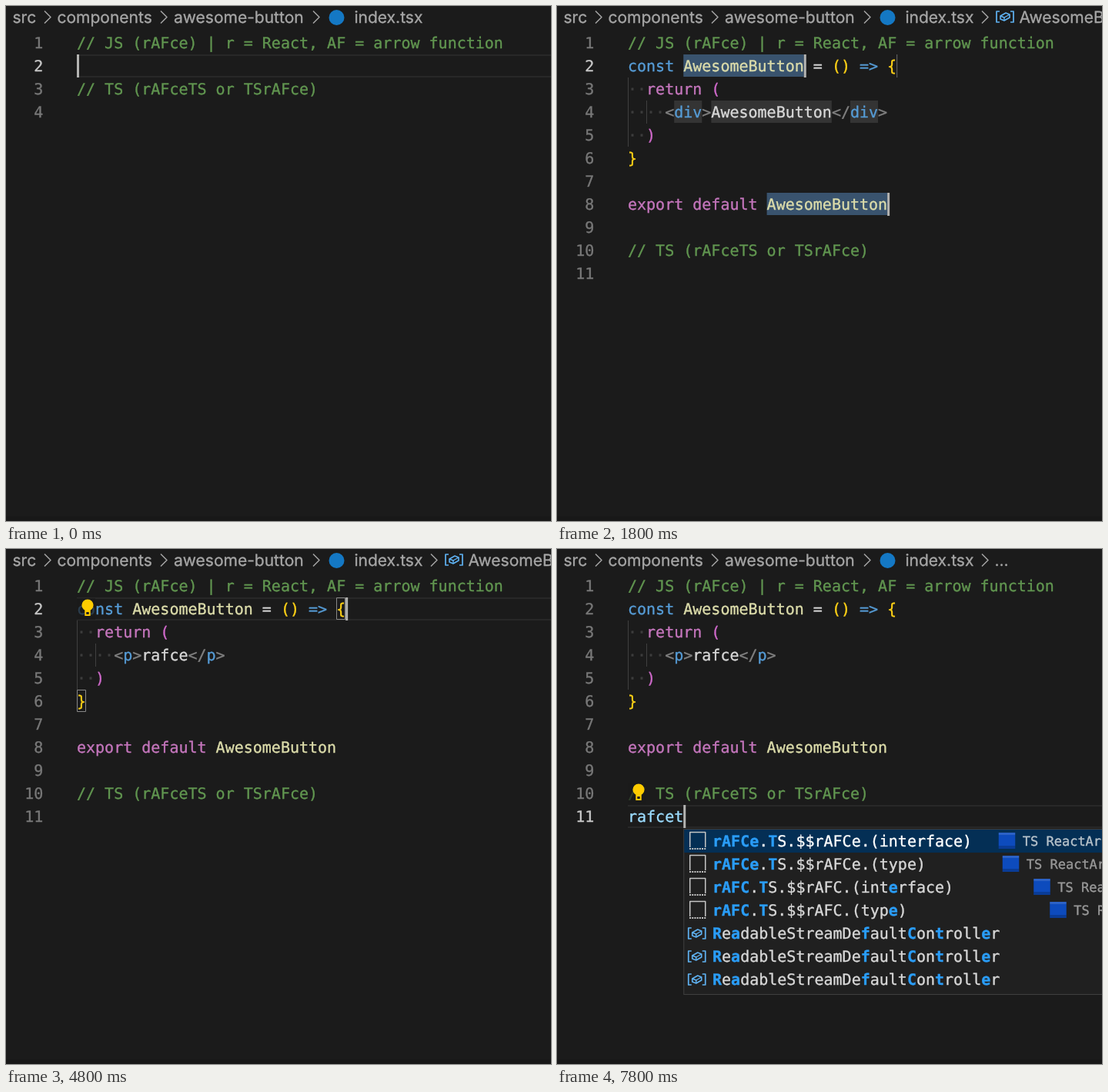
Write an HTML page with a canvas that moves like this. It is 708 px wide and 670 px high and loops after 8 s.

```html
<!DOCTYPE html>
<html lang="en">
<head>
<meta charset="utf-8">
<title>Editor snippets</title>
<style>
  html, body { margin: 0; width: 100%; height: 100%; overflow: hidden; background: #1b1b1b; }
  canvas { display: block; }
</style>
</head>
<body>
<canvas id="stage" width="708" height="670"></canvas>
<script>
const ctx = document.getElementById('stage').getContext('2d');
ctx.textRendering = 'geometricPrecision';
ctx.lineJoin = 'round';
const LOOP = 8000, STEP = 200;
const LEFT = 92, CHAR = 12.04, ROW = 30;
const MONO = '"DejaVu Sans Mono", monospace';
const C = {
  bg: '#1b1b1b', comment: '#619650', blue: '#569cd6', pink: '#c576bd', orchid: '#d06acb',
  gold: '#ffd216', name: '#dcdcaa', plain: '#d8d8d8', tag: '#808080', variable: '#9cdcfe',
  match: '#2a9df8', symbol: '#5fb2f2', crumb: '#a6a6a6', yellow: '#bd8b12', royal: '#0d4bbd'
};

// label, detail colour, detail text, detail offset from the popup's left edge
const ITEMS = {
  hook: ['rafhook.$rafhook.hook', C.yellow, 'reactCustomHook', 476],
  c: ['rAFC.$rAFC', C.yellow, 'reactArrowFn', 538],
  cI: ['rAFC.TS.$$rAFC.(interface)', C.royal, 'TS ReactArrowFn', 486],
  cT: ['rAFC.TS.$$rAFC.(type)', C.royal, 'TS ReactArrowFn', 507],
  ce: ['rAFCe.$rAFCe', C.yellow, 'reactArrowFn', 476.5],
  ceI: ['rAFCe.TS.$$rAFCe.(interface)', C.royal, 'TS ReactArrowFn', 440.5],
  ceT: ['rAFCe.TS.$$rAFCe.(type)', C.royal, 'TS ReactArrowFn', 445.5],
  cne: ['rAFCne.$rAFCne', C.yellow, 'reactArrowFnComp', 456.5],
  cp: ['rAFCp.$rAFCp', C.yellow, 'reactArrowFnComp', 446],
  cpch: ['rAFCpch.$rAFCpch', C.yellow, 'reactArrowFnCompProps', 385],
  native: ['rnAFCe.$rnAFCe', C.yellow, 'reactNativeArrowFn', 416],
  emoE: ['emoRAFCe.$emoRAFCe', C.yellow, 'reactArrowFnComp', 405.5],
  emo: ['emoRAFC.$emoRAFC', C.yellow, 'reactArrowFn', 467],
  fI: ['rFC.TS.$$rFC.(interface)', C.royal, 'TS React', 538],
  feI: ['rFCe.TS.$$rFCe.(interface)', C.royal, 'TS ReactFn', 476],
  read: ['readFileSync'],
  stream: ['ReadableStreamDefaultController']
};
const LISTS = {
  raf: 'hook c cI cT ce ceI ceT cne cp cpch read emo',
  rafc: 'c cI cT ce ceI ceT cne cp cpch emo emoE read',
  rafce: 'ce ceI ceT cne native emoE cI cT emo fI feI read',
  rafcet: 'ceI ceT cI cT stream stream stream'
};

const colX = col => LEFT + col * CHAR;
const rowY = line => 3 + line * ROW;

function rect(x, y, w, h, color) {
  ctx.fillStyle = color;
  ctx.fillRect(x, y, w, h);
}

// A hairline stroke gives the slightly heavy look of smoothed screen text
function text(str, x, y, color, font = '20px ' + MONO) {
  ctx.font = font;
  ctx.fillStyle = ctx.strokeStyle = color;
  ctx.lineWidth = .35;
  ctx.fillText(str, x, y);
  ctx.strokeText(str, x, y);
}

function poly(points, color, width = 1.5, closed = false) {
  ctx.beginPath();
  points.forEach(([x, y]) => ctx.lineTo(x, y));
  if (closed) ctx.closePath();
  ctx.strokeStyle = color;
  ctx.lineWidth = width;
  ctx.stroke();
}

function disc(x, y, r, color) {
  ctx.fillStyle = color;
  ctx.beginPath();
  ctx.arc(x, y, r, 0, 7);
  ctx.fill();
}

function code(line, ...tokens) {
  let col = 0;
  for (const [str, color] of tokens) {
    text(str, colX(col), rowY(line) + 22, color);
    col += str.length;
  }
}

function cube(x, y, w, h, color) {
  poly([[x, y - h], [x + w, y - h / 2], [x + w, y + h / 2], [x, y + h], [x - w, y + h / 2], [x - w, y - h / 2]], color, 1.6, true);
  poly([[x - w, y - h / 2], [x, y], [x + w, y - h / 2]], color, 1.6);
  poly([[x, y], [x, y + h]], color, 1.6);
}

function variableIcon(x, y) {
  for (const s of [-1, 1])
    poly([[x + 7 * s, y - 7], [x + 11 * s, y - 7], [x + 11 * s, y + 7], [x + 7 * s, y + 7]], C.symbol, 1.7);
  poly([[x - 6, y - 1], [x + 1, y - 5], [x + 6, y - 3], [x + 6, y + 1], [x - 1, y + 5], [x - 6, y + 3]], C.symbol, 1.6, true);
  poly([[x - 6, y - 1], [x - 1, y + 1], [x + 6, y - 3]], C.symbol, 1.4);
  poly([[x - 1, y + 1], [x - 1, y + 5]], C.symbol, 1.4);
}

function snippetIcon(x, y) {
  const color = '#c5c5c5';
  poly([[x - 10, y + 8], [x - 10, y - 11.5], [x + 10, y - 11.5], [x + 10, y + 8]], color);
  for (let i = 0; i < 7; i++) rect(x - 10.7 + i * 3.2, y + 9, 2, 2, color);
}

function detailSquare(x, y, color) {
  rect(x, y, 21.5, 21, color);
  rect(x, y, 21.5, 3, 'rgba(255,255,255,.13)');
  rect(x, y + 17, 21.5, 4, 'rgba(0,0,0,.2)');
}

function bulb(line) {
  const y = rowY(line) + 15;
  rect(LEFT, y - 14, 24, 28, 'rgba(27,27,27,.72)');
  disc(106, y - 5, 7.6, '#ffcc00');
  rect(102.3, y, 7.4, 9, '#ffcc00');
  rect(104.3, y + 4, 3.4, 3, C.bg);
}

const cursor = (line, col) => rect(colX(col), rowY(line), 3, ROW, '#b4b4b2');

function bracketBox(line, col) {
  ctx.strokeStyle = '#888';
  ctx.lineWidth = 1;
  ctx.strokeRect(Math.round(colX(col)) + .5, rowY(line) + .5, 11, ROW - 2);
}

function activeBorder(line) {
  rect(LEFT, rowY(line), 616, 2, '#282828');
  rect(LEFT, rowY(line) + 28, 616, 2, '#282828');
}

// Positions of the query's letters in the label, allowing one swap of neighbours
function fuzzy(label, query) {
  const tries = [query];
  for (let i = 0; i < query.length - 1; i++)
    tries.push(query.slice(0, i) + query[i + 1] + query[i] + query.slice(i + 2));
  for (const word of tries) {
    const hits = [];
    for (let i = 0; i < label.length; i++)
      if (label[i].toLowerCase() === word[hits.length]) hits.push(i);
    if (hits.length === word.length) return hits;
  }
  return [];
}

function popup(line, query) {
  const x = colX(query.length), top = rowY(line) + 31;
  const keys = (LISTS[query] || LISTS.raf).split(' ');
  const height = keys.length * ROW + 6;
  rect(x, top, 800, height, '#3f3f3f');
  rect(x + 1, top + 1, 800, height - 2, '#202020');
  rect(x + 1, top + 1, 800, ROW, '#042f55');
  keys.forEach((key, i) => {
    const [label, color, detail, offset] = ITEMS[key];
    const y = top + 16 + i * ROW;
    const hits = fuzzy(label, query);
    if (key === 'read') cube(x + 18.5, y - 1, 9.5, 11, '#b877d0');
    else if (key === 'stream') variableIcon(x + 17.5, y);
    else snippetIcon(x + 18.5, y);
    [...label].forEach((ch, j) => {
      const hit = hits.includes(j);
      text(ch, x + 37.8 + j * CHAR, y + 7, hit ? C.match : i ? C.plain : '#fff', (hit ? 'bold ' : '') + '20px ' + MONO);
    });
    if (detail) {
      detailSquare(x + offset - 31, y - 11, color);
      text(detail, x + offset, y + 6, i ? '#999' : '#b9c4cc', '17px ' + MONO);
    }
  });
}

function breadcrumb(tail) {
  const crumb = (str, x) => text(str, x, 22, C.crumb, '21px Inter, sans-serif');
  const chevron = x => poly([[x, 6.5], [x + 8, 14.5], [x, 22.5]], C.crumb, 1.5);
  crumb('src', 8.5);
  chevron(50);
  crumb('components', 66.5);
  chevron(201);
  crumb('awesome-button', 218);
  chevron(399);
  disc(429.5, 15, 10, '#1478c4');
  crumb('index.tsx', 452.5);
  if (!tail) return;
  chevron(552);
  if (tail === '...') return crumb(tail, 568.5);
  variableIcon(582, 14);
  crumb(tail, 600.5);
}

function lineNumbers(count, active) {
  ctx.textAlign = 'right';
  for (let n = 1; n <= count; n++)
    text(n, 48.4, rowY(n) + 22, n === active ? '#c8c8c8' : '#787878');
  ctx.textAlign = 'left';
}

const JS_NOTE = ['// JS (rAFce) | r = React, AF = arrow function', C.comment];
const TS_NOTE = ['// TS (rAFceTS or TSrAFce)', C.comment];

function drawTrigger(step) {
  const typed = 'rafce'.slice(0, Math.max(0, step - 1));
  breadcrumb();
  activeBorder(2);
  lineNumbers(4, 2);
  code(1, JS_NOTE);
  code(2, [typed, C.variable]);
  code(3, TS_NOTE);
  if (step >= 5) bulb(1);
  cursor(2, typed.length);
  if (step >= 3) popup(2, typed);
}

function drawComponent(step) {
  const session = step < 22;
  const tag = step < 14 ? 'div' : 'p';
  const child = step < 16 ? 'AwesomeButton' : 'rafce'.slice(0, step - 15);
  const typed = step < 32 ? '' : 'rafcet'.slice(0, [1, 2, 3, 3, 4, 5, 5, 6][step - 32]);
  const stop = step < 10 ? 0 : step < 15 ? 1 : 2;
  const selected = step < 14 || step === 15;
  const active = session ? (stop ? 4 : 2) : step < 29 ? 2 : 11;
  const closing = 8 + tag.length + child.length;
  // line, column and length of every linked placeholder
  const stops = [
    [[2, 6, 13], [8, 15, 13]],
    [[4, 5, tag.length], [4, closing, tag.length]],
    [[4, 5 + tag.length + 1, child.length]]
  ];

  breadcrumb(step < 8 ? '' : step < 30 ? 'AwesomeButton' : '...');
  if (!session || !selected) activeBorder(active);
  if (session) stops.forEach((ranges, i) => ranges.forEach(([line, col, length]) =>
    rect(colX(col), rowY(line), length * CHAR, ROW - 1, i === stop && selected ? '#39536e' : '#343434')));
  lineNumbers(11, active);

  const dots = n => ['·'.repeat(n), '#3c3c3c'];
  code(1, JS_NOTE);
  code(2, ['const ', C.blue], ['AwesomeButton', C.name], [' = ', C.plain], ['() ', C.gold], ['=> ', C.blue], ['{', C.gold]);
  code(3, dots(2), ['return ', C.pink], ['(', C.orchid]);
  code(4, dots(4), ['<', C.tag], [tag, C.blue], ['>', C.tag], [child, C.plain], ['</', C.tag], [tag, C.blue], ['>', C.tag]);
  code(5, dots(2), [')', C.orchid]);
  code(6, ['}', C.gold]);
  code(8, ['export default ', C.pink], ['AwesomeButton', C.name]);
  code(10, TS_NOTE);
  code(11, [typed, C.variable]);
  rect(LEFT, rowY(3), 1, 3 * ROW, '#404040');
  rect(LEFT + 24, rowY(4), 1, ROW, '#404040');

  if (session) {
    rect(colX(29), rowY(2), 1, ROW, '#6a6a6a');
    if (!selected) {
      bracketBox(3, 9);
      bracketBox(5, 2);
    }
  } else if (active === 2) {
    bracketBox(2, 28);
    bracketBox(6, 0);
  }

  if (step >= 12 && step < 22) bulb(4);
  if (step >= 24 && step < 30) bulb(2);
  if (step >= 38) bulb(10);

  if (session) stops[stop].forEach(([line, col, length]) => cursor(line, col + length));
  else if (active === 2) cursor(2, 29);
  else cursor(11, typed.length);
  if (typed.length > 1) popup(11, typed);
}

function frame(now) {
  const step = Math.floor((now % LOOP) / STEP);
  rect(0, 0, 708, 670, C.bg);
  rect(0, 664, 708, 6, '#181818');
  (step < 7 ? drawTrigger : drawComponent)(step);
  requestAnimationFrame(frame);
}
requestAnimationFrame(frame);
</script>
</body>
</html>
```
